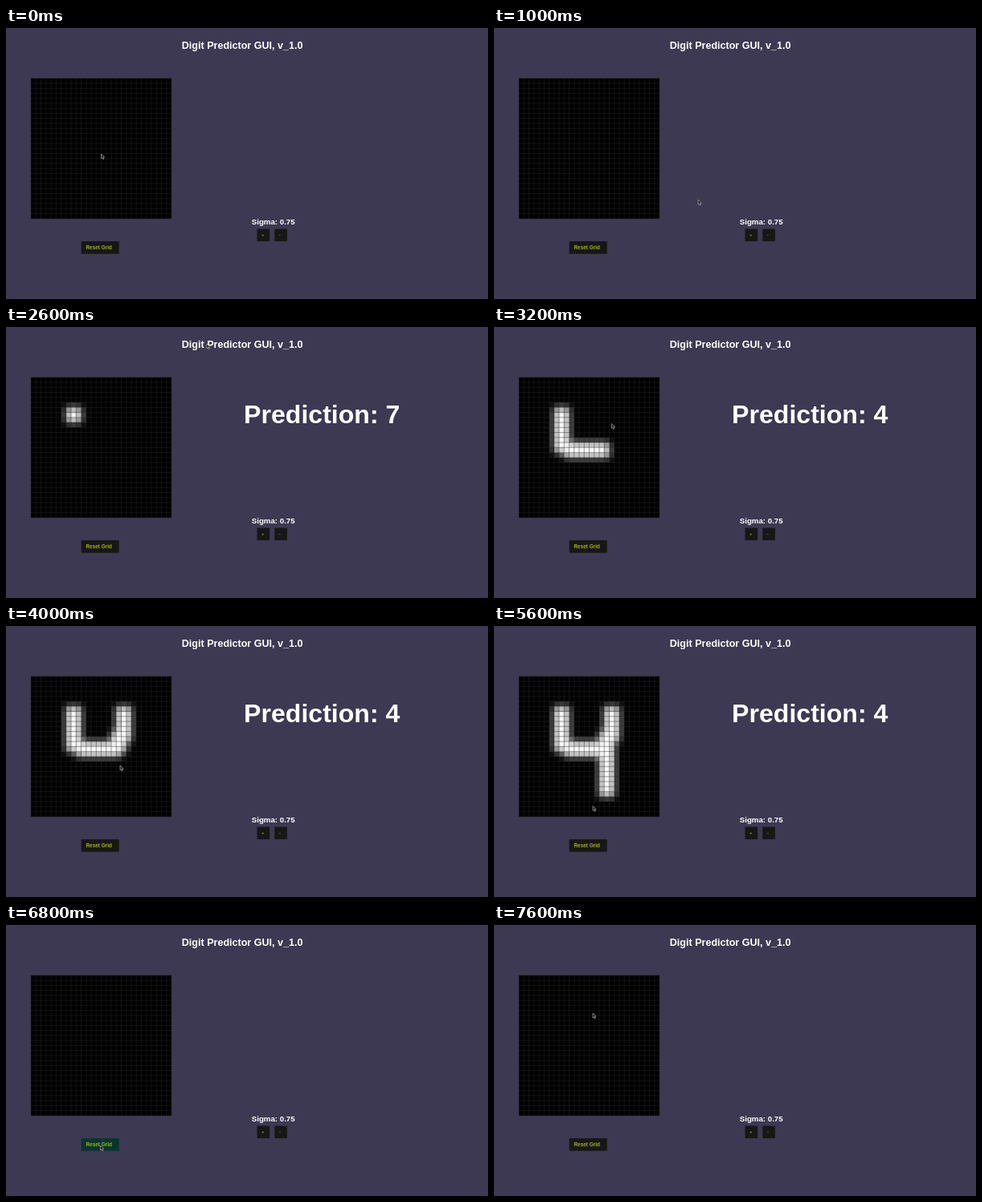
An HTML page that plays this animation: 600x338 px, repeating every 8000 ms.

```html
<!DOCTYPE html>
<html lang="en">
<head>
<meta charset="utf-8">
<title>Digit Predictor</title>
<style>
html, body { margin: 0; width: 100%; height: 100%; overflow: hidden; background: #3d3953; }
svg { display: block; width: 100vw; height: 100vh; }
text { font-family: "Liberation Sans", Arial, sans-serif; font-weight: bold; fill: #fff; }
.btn { fill: #171815; }
.label { font-size: 6.4px; fill: #a3b312; }
.sign { font-size: 5.4px; fill: #8c9a14; }
</style>
</head>
<body>
<svg viewBox="0 0 600 338">
  <rect width="600" height="338" fill="#3d3953"/>
  <text x="218.8" y="25.5" font-size="12.55">Digit Predictor GUI, v_1.0</text>
  <text id="guess" x="296.1" y="119.6" font-size="32.1"></text>
  <text x="305.8" y="245.4" font-size="9.7">Sigma: 0.75</text>
  <rect class="btn" x="312.5" y="250.5" width="15.6" height="15.5"/>
  <rect class="btn" x="334.3" y="250.5" width="15.6" height="15.5"/>
  <text class="sign" x="318.3" y="260.2">+</text>
  <text class="sign" x="340" y="260.2">-</text>
  <rect id="reset" class="btn" x="93.7" y="266" width="47" height="15.7"/>
  <text class="label" x="99.5" y="275.8">Reset Grid</text>
  <rect x="31" y="62.8" width="175" height="175" fill="#000"/>
  <g id="cells" transform="translate(31 62.8)" shape-rendering="crispEdges"></g>
  <path id="lines" transform="translate(31 62.8)" stroke="#2a2a2a" stroke-width=".45" fill="none"/>
  <path id="cursor" d="M0 0V5.8L1.4 4.6 2.4 6.8 3.3 6.4 2.4 4.2H4.2Z" fill="#141414" stroke="#c8c8c8" stroke-width=".6"/>
</svg>
<script>
const LOOP = 8000, STEP = 200, N = 28, CELL = 6.25, SIGMA = 0.75;
const LEFT = 31, TOP = 62.8, CLEARED = 6800;
const $ = id => document.getElementById(id);

// Cells the pen visits and when it reaches them
const pen = [];
function line(from, to, x, y, dx, dy, n) {
  for (let i = 0; i < n; i++)
    pen.push({ t: from + (to - from) * i / n, x: x + dx * i, y: y + dy * i });
}
line(1400, 1400, 8, 7, 0, 0, 1);
line(2700, 2900, 8, 8, 0, 1, 6);
line(2900, 3100, 10, 14, 1, 0, 7);
line(3400, 3700, 18, 7, 0, 1, 5);
line(3700, 3800, 17, 12, 0, 1, 2);
line(4100, 4600, 17, 14, 0, 1, 9);

// The cursor follows the pen and glides through these stops between lines
const stop = (t, x, y) => ({ t, x, y });
const route = [
  stop(0, 118.5, 157),
  stop(400, 260, 17),
  stop(800, 340, 268),
  stop(1800, 82.5, 107),
  stop(2200, 320, 238),
  stop(2600, 250, 21),
  stop(3200, 146.3, 120.5),
  stop(4000, 142, 174),
  stop(5000, 141, 210),
  stop(5400, 141, 210),
  stop(5600, 123, 224.5),
  stop(6400, 117.5, 275),
  stop(CLEARED, 117.5, 275),
  stop(7600, 123, 110),
  stop(LOOP, 123, 110),
  ...pen.map(p => stop(p.t, LEFT + (p.x + .24) * CELL, TOP + (p.y + .07) * CELL))
].sort((a, b) => a.t - b.t);

function along(t) {
  const i = route.findIndex(s => s.t > t);
  const a = route[i - 1], b = route[i];
  const p = (t - a.t) / (b.t - a.t);
  return [a.x + (b.x - a.x) * p, a.y + (b.y - a.y) * p];
}

function guess(t) {
  if (t < 1600 || t >= 6600) return "";
  return "Prediction: " + (t < 3200 ? 7 : 4);
}

const kernel = [];
for (let i = -3; i <= 3; i++) kernel.push(Math.exp(-i * i / (2 * SIGMA * SIGMA)));
const total = kernel.reduce((a, b) => a + b);

// One blur pass along the given index stride
const blur = (ink, stride) => ink.map((_, i) =>
  kernel.reduce((sum, k, j) => sum + k / total * (ink[i + (j - 3) * stride] || 0), 0));

const rects = [];
for (let i = 0; i < N * N; i++) {
  const r = document.createElementNS("http://www.w3.org/2000/svg", "rect");
  r.setAttribute("x", i % N * CELL);
  r.setAttribute("y", Math.floor(i / N) * CELL);
  r.setAttribute("width", CELL);
  r.setAttribute("height", CELL);
  $("cells").append(r);
  rects.push(r);
}

let mesh = "";
for (let i = 0; i <= N; i++) mesh += `M${i * CELL} 0V175M0 ${i * CELL}H175`;
$("lines").setAttribute("d", mesh);

let shown = -1;
function paint(cells) {
  if (cells.length === shown) return;
  shown = cells.length;
  const ink = new Array(N * N).fill(0);
  for (const { x, y } of cells)
    for (let dy = -1; dy <= 1; dy++)
      for (let dx = -1; dx <= 1; dx++) ink[(y + dy) * N + x + dx] = 1;
  blur(blur(ink, 1), N).forEach((v, i) => {
    const c = Math.round(255 * Math.min(1, v));
    rects[i].setAttribute("fill", `rgb(${c},${c},${c})`);
  });
}

function draw(time) {
  const t = Math.floor(time % LOOP / STEP) * STEP;
  const [x, y] = along(t);
  paint(pen.filter(p => p.t <= t && t < CLEARED));
  $("guess").textContent = guess(t);
  $("cursor").setAttribute("transform", `translate(${x} ${y})`);
  const hover = x > 93 && x < 141 && y > 266 && y < 282;
  $("reset").style.fill = hover ? "#08362f" : "";
}

const start = performance.now();
function tick() {
  draw(performance.now() - start);
  requestAnimationFrame(tick);
}
tick();
</script>
</body>
</html>
```
